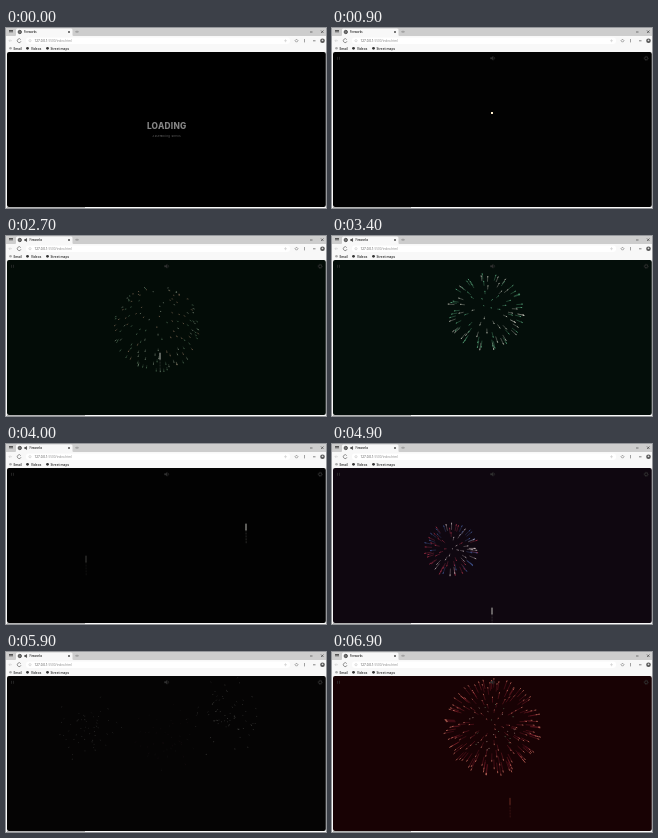
These frames come from a looping animation (320x180 px, 7000 ms). An HTML page:

```html
<!DOCTYPE html>
<html lang="en">
<head>
<meta charset="utf-8">
<title>Fireworks</title>
<style>
html, body { margin: 0; width: 100%; height: 100%; overflow: hidden; background: #fff; }
svg { display: block; width: 100vw; height: 100vh; }
text { font-family: "Open Sans", "Noto Sans", sans-serif; }
.load { font-family: Inter, Roboto, sans-serif; text-anchor: middle; }
</style>
</head>
<body>
<svg viewBox="0 0 320 180" xmlns="http://www.w3.org/2000/svg">
  <defs><clipPath id="view"><rect x="1" y="24" width="318.800" height="155" rx="2"/></clipPath></defs>
  <rect width="320" height="180" fill="#f8f8f8"/>
  <rect width="320" height="8" fill="#cdcdcd"/>
  <path d="M9 8q1 0 1-1V2q0-1.500 1.500-1.500h53.500q1.500 0 1.500 1.500v5q0 1 1 1z" fill="#f8f8f8"/>
  <rect x="20" y="9.500" width="264" height="6.500" rx="3" fill="#fff"/>

  <g fill="none" stroke="#555" stroke-width=".6">
    <path d="M3 2.500h4M3 3.800h4" stroke="#222" stroke-width=".7"/>
    <path d="M62 3l2 2m0-2l-2 2" stroke="#222"/>
    <path d="M69 3.800h4M71 2.600v2.400" stroke="#888"/>
    <path d="M304 4h2.500M315 2.500l2.500 2.500m0-2.500l-2.500 2.500" stroke="#333"/>
    <path d="M6 12.700H3l1.200-1.300M3 12.700l1.200 1.300" stroke="#ccc"/>
    <path d="M14.800 11.700a1.900 1.900 0 1 0 .2 1.500"/>
    <circle cx="24" cy="12.700" r="1.100" stroke="#aaa" stroke-width=".4"/>
    <path d="M278 12.700h3M279.500 11.200v3" stroke="#ccc"/>
    <path d="M289 12.700l1.500-1.500l1.500 1.500l-1.500 1.500zM298.500 11v3.400" stroke="#666"/>
    <path d="M307 12.800h2.500" stroke="#333"/>
  </g>
  <circle cx="316.500" cy="12.700" r="2.300" fill="#555"/>
  <circle cx="316.500" cy="12.300" r=".9" fill="#ddd"/>

  <circle cx="13.800" cy="4" r="1.700" fill="#777" stroke="#333" stroke-width=".7"/>
  <path id="audio" d="M18.600 3.400h.8l1.200-1v3.200l-1.200-1h-.8z" fill="#222" stroke="#222" stroke-width=".4"/>
  <text id="tab" x="18" y="5" font-size="2.700" font-weight="600" fill="#222">Fireworks</text>
  <text x="28.500" y="13.900" font-size="3.100" fill="#444">127.0.0.1<tspan fill="#888">:5500/index.html</tspan></text>

  <g font-size="3.200" font-weight="600" fill="#222">
    <circle cx="4.500" cy="20.300" r="1.300" fill="#aaa"/>
    <circle cx="21.500" cy="20.300" r="1.400" fill="#333"/>
    <circle cx="41.500" cy="20.300" r="1.400" fill="#333"/>
    <text x="7.500" y="21.500">Email</text>
    <text x="25" y="21.500">Videos</text>
    <text x="44.500" y="21.500">Street maps</text>
  </g>

  <rect x="1" y="24" width="318.800" height="155" rx="2" id="sky"/>
  <g clip-path="url(#view)" id="stage" fill="none" stroke-linecap="round"></g>

  <g id="loading">
    <text class="load" x="160.700" y="101" font-size="8.300" font-weight="800" letter-spacing=".25" fill="#858585">LOADING</text>
    <text class="load" x="160.700" y="108.700" font-size="2.500" letter-spacing=".4" fill="#777">Assembling Shells</text>
  </g>
  <g id="controls" fill="#303030" stroke="#303030" stroke-width=".6">
    <path d="M5.500 28.800v3M7.500 28.800v3" stroke-width=".7"/>
    <path d="M158.500 29.500h1.200l1.500-1.200v4l-1.500-1.200h-1.200zM162.300 29q1 1.300 0 2.600" stroke-width=".4"/>
    <circle cx="314.200" cy="30.300" r="1.500" fill="none" stroke-width="1"/>
    <circle cx="314.200" cy="30.300" r="2.200" fill="none" stroke-width=".6" stroke-dasharray=".9 .83"/>
  </g>
  <path d="M1 179.600H79" stroke="#777" stroke-width=".6"/>
</svg>
<script>
const LOOP = 7000, STEP = 100, FLIGHT = 0.4, GROUND = 182;
const $ = id => document.getElementById(id);
const clamp = v => Math.max(0, Math.min(1, v));

const shells = [
  { at: 0.9, x: 160, y: 85, r: 50, n: 100, life: 0.93, tail: 0.4, colors: ['#d9b56a', '#fff0cf'], tint: [12, 9, 4] },
  { at: 2.05, x: 151, y: 90, r: 44, n: 190, life: 0.98, tail: 0.22, twinkle: 0.35, colors: ['#b9c9b4', '#7fae88', '#c9a183'], tint: [2, 18, 10] },
  { at: 2.951, x: 154, y: 75, r: 42, n: 80, life: 0.85, tail: 0.4, colors: ['#6fd09a', '#f2f2e4'], tint: [3, 16, 10] },
  { at: 4.108, x: 240, y: 72, r: 34, n: 60, life: 0.72, tail: 0.4, colors: ['#6a8fe8', '#f0f0ff'], tint: [6, 6, 16] },
  { at: 4.177, x: 80, y: 95, r: 30, n: 50, life: 0.65, tail: 0.4, dim: 0.3, colors: ['#e05a74', '#f0f0ff'], tint: [6, 2, 6] },
  { at: 4.65, x: 119.5, y: 105, r: 36, n: 66, life: 0.85, tail: 0.4, colors: ['#b8354f', '#4a64a8', '#d8c8cc'], tint: [13, 5, 14] },
  { at: 5.261, x: 160, y: 85, r: 34, n: 40, life: 0.66, tail: 0.2, spread: 1, colors: ['#c8c8c0', '#d88aa0'], tint: [7, 3, 5] },
  { at: 5.32, x: 80, y: 73, r: 34, n: 70, life: 0.66, tail: 0.04, spread: 1, twinkle: 0.3, colors: ['#b8b8b0', '#8c8c8c'], tint: [5, 5, 5] },
  { at: 5.32, x: 220, y: 62, r: 42, n: 95, life: 0.68, tail: 0.04, spread: 1, twinkle: 0.3, colors: ['#c8c8c0', '#989898'], tint: [5, 5, 5] },
  { at: 6.45, x: 160.5, y: 74, r: 52.5, n: 140, life: 0.9, tail: 0.46, colors: ['#a8263c', '#b8303f', '#8e2036'], head: '#d8846c', tint: [27, 0, 3] },
  { at: 6.45, x: 160.5, y: 74, r: 26, n: 18, life: 0.8, tail: 0.06, pistil: true, colors: ['#6f9a72', '#c4a49a'], tint: [0, 0, 0] },
  { at: 7.23, x: 178, y: 70, r: 40, n: 60, life: 0.8, tail: 0.4, dim: 0.6, trail: '#b4503e', colors: ['#d43a50'], tint: [0, 0, 0] }
];

function random(seed) {
  return () => {
    seed = (seed * 1664525 + 1013904223) >>> 0;
    return seed / 4294967296;
  };
}

function addPath(color, width) {
  const p = document.createElementNS('http://www.w3.org/2000/svg', 'path');
  p.setAttribute('stroke', color);
  p.setAttribute('stroke-width', width);
  $('stage').append(p);
  return p;
}

// Rings of a sphere seen from the front, jittered.
function makeStars(s, rnd) {
  const around = Math.PI * Math.sqrt(s.n / Math.PI), half = around / 2, stars = [];
  for (let i = 0; i <= half; i++) {
    const size = Math.cos(i / half * Math.PI / 2);
    const step = 2 * Math.PI / Math.max(1, around * size);
    const start = rnd() * step;
    for (let k = 0; k * step < 2 * Math.PI - 0.01; k++) {
      const angle = start + k * step + (rnd() - 0.5) * step * 0.5;
      const speed = size * (s.spread ? 0.15 + rnd() * 0.95 : 0.96 + rnd() * 0.06);
      stars.push({
        dx: Math.cos(angle) * speed * s.r,
        dy: Math.sin(angle) * speed * s.r,
        phase: rnd(),
        color: Math.floor(rnd() * s.colors.length)
      });
    }
  }
  return stars;
}

shells.forEach((s, i) => {
  s.stars = makeStars(s, random(91 + i * 7919));
  s.tails = s.colors.map(c => addPath(c, 0.45));
  s.heads = s.colors.map(c => addPath(s.head || c, 0.6));
  s.smoke = addPath(s.trail || '#8a8a84', 0.5);
  s.smoke.setAttribute('stroke-dasharray', '1.2 1.7');
  s.rocket = addPath(s.trail || '#e4e4dc', 0.9);
});

function starAt(s, star, age) {
  const k = 1 - Math.exp(-5.5 * age);
  return [s.x + star.dx * k, s.y + star.dy * k + 6 * age * age];
}

const line = (a, b) => `M${a[0].toFixed(2)} ${a[1].toFixed(2)}L${b[0].toFixed(2)} ${b[1].toFixed(2)}`;

function drawBurst(s, age) {
  const live = age >= 0 && age < s.life;
  const tails = s.colors.map(() => ''), heads = s.colors.map(() => '');
  if (live) {
    for (const star of s.stars) {
      const blink = (star.phase * 13 + age * (3 + star.phase * 4)) % 1;
      if (age > 0.45 && blink < (s.twinkle || 0)) continue;
      const tip = starAt(s, star, age);
      tails[star.color] += line(starAt(s, star, age * (1 - s.tail)), tip);
      heads[star.color] += line(starAt(s, star, age * (1 - s.tail * 0.2)), tip);
    }
  }
  const fade = clamp((s.life - age) / (s.life * 0.5));
  s.colors.forEach((c, i) => {
    s.tails[i].setAttribute('d', tails[i]);
    s.heads[i].setAttribute('d', heads[i]);
    s.tails[i].setAttribute('opacity', fade * 0.65);
    s.heads[i].setAttribute('opacity', fade);
  });
}

function drawRocket(s, age) {
  const p = 1 + age / FLIGHT;
  const flying = p >= 0 && p < 1 && !s.pistil;
  const y = GROUND - (GROUND - s.y) * (1 - (1 - p) ** 2);
  s.rocket.setAttribute('d', flying ? line([s.x, y], [s.x, y + 6]) : '');
  s.smoke.setAttribute('d', flying ? line([s.x, y + 6], [s.x + 0.2, y + 20]) : '');
  s.rocket.setAttribute('opacity', s.dim || 0.9);
  s.smoke.setAttribute('opacity', (s.dim || 0.8) * 0.7);
}

function draw(ms) {
  const t = ms / 1000, loading = ms < 500, sound = ms >= 2000 && ms < 6300;
  const sky = loading ? [0, 0, 0] : [2, 2, 2];
  for (const s of shells) {
    const age = t - s.at;
    drawBurst(s, age);
    drawRocket(s, age);
    const glow = age < 0 ? 0 : clamp(age / 0.1) * clamp((s.life - age) / s.life * 1.6);
    s.tint.forEach((v, i) => sky[i] += v * glow);
  }
  $('sky').setAttribute('fill', `rgb(${sky.map(Math.round)})`);
  $('loading').setAttribute('visibility', loading ? 'visible' : 'hidden');
  $('controls').setAttribute('visibility', loading ? 'hidden' : 'visible');
  $('audio').setAttribute('visibility', sound ? 'visible' : 'hidden');
  $('tab').setAttribute('x', sound ? 23.5 : 18);
}

const begin = performance.now();
function tick() {
  const ms = (performance.now() - begin) % LOOP;
  draw(Math.floor(ms / STEP) * STEP);
  requestAnimationFrame(tick);
}
tick();
</script>
</body>
</html>
```
